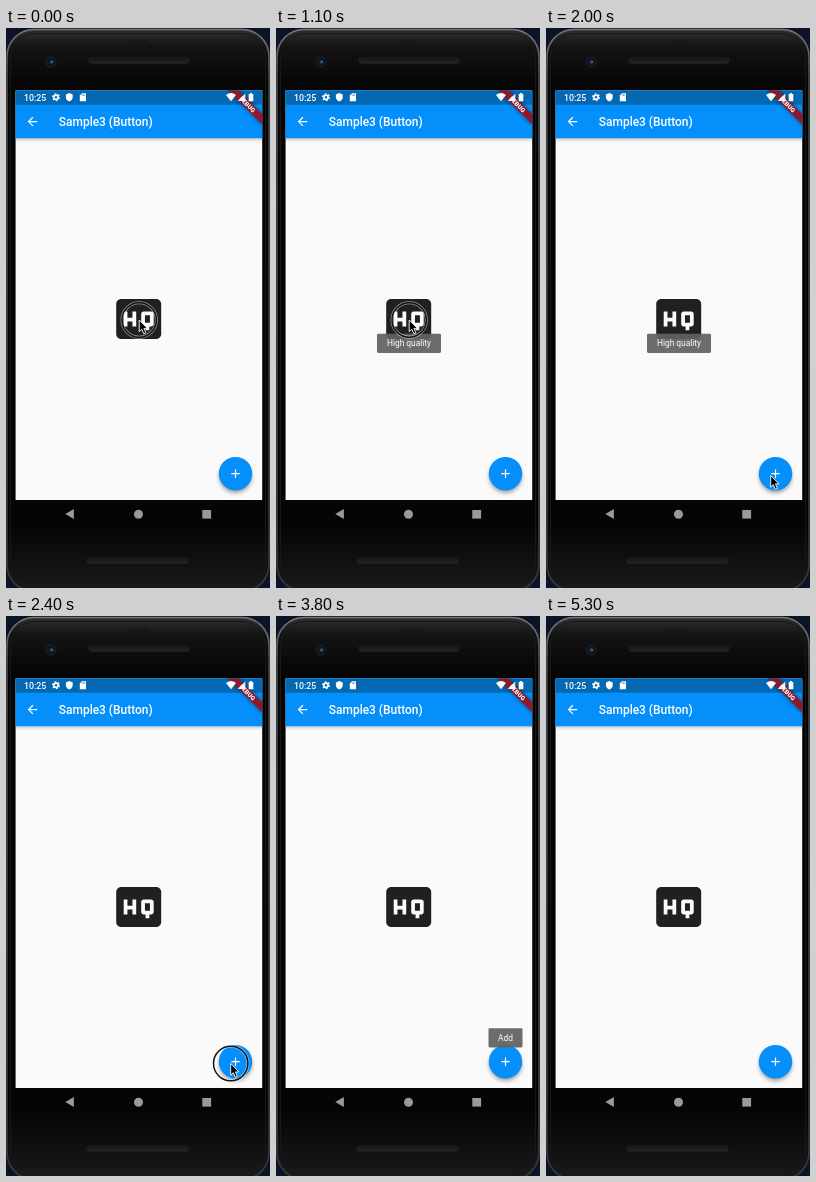
Recreate the animation shown at these times as an HTML page. Size 264 px wide and 560 px high, loop 5.4 s.

```html
<!DOCTYPE html>
<html lang="en">
<head>
<meta charset="utf-8">
<title>Button tooltips</title>
<style>
  html, body { margin: 0; width: 100%; height: 100%; overflow: hidden; background: #0b1426; }
  svg { display: block; font-family: Roboto, sans-serif; }
  .tip rect { fill: #616161; fill-opacity: .93; }
  .tip text { fill: #fff; font-size: 8.4px; text-anchor: middle; }
</style>
</head>
<body>
<svg width="264" height="560" viewBox="0 0 264 560">
  <defs>
    <clipPath id="screen"><rect x="9.6" y="62.4" width="246.6" height="409.6"/></clipPath>
    <filter id="soft" x="-50%" y="-50%" width="200%" height="200%"><feGaussianBlur stdDeviation="2.2"/></filter>
    <linearGradient id="slot" x2="0" y2="1">
      <stop stop-color="#141414"/><stop offset="1" stop-color="#262626"/>
    </linearGradient>
    <linearGradient id="edge" x2="0" y2="1">
      <stop stop-color="#777"/><stop offset=".08" stop-color="#484a4c"/><stop offset="1" stop-color="#38393b"/>
    </linearGradient>
    <linearGradient id="body" x2="0" y2="1">
      <stop stop-color="#303030"/><stop offset=".03" stop-color="#141414"/><stop offset=".1" stop-color="#050505"/>
      <stop offset=".88" stop-color="#050505"/><stop offset="1" stop-color="#1a1a1a"/>
    </linearGradient>
  </defs>

  <!-- phone body -->
  <rect x="0" y="154" width="2" height="38" fill="#222"/>
  <rect x="1" y="1.5" width="262" height="562" rx="27" fill="url(#body)" stroke="url(#edge)" stroke-width="1.6"/>
  <rect x="4.5" y="5.5" width="255" height="555" rx="24" fill="none" stroke="#181818"/>
  <g fill="url(#slot)" stroke="#222" stroke-width=".6">
    <rect x="82.5" y="29.5" width="101" height="6" rx="3"/>
    <rect x="80.5" y="530" width="102" height="5.5" rx="2.75"/>
  </g>
  <rect x="124" y="12" width="18" height="5" rx="1" fill="#15181c"/>
  <circle cx="45" cy="34" r="5" fill="#10141b" stroke="#20242a"/>
  <circle cx="45.3" cy="34" r="1.9" fill="#1c3860"/>
  <circle cx="46" cy="33.8" r=".9" fill="#4a80c0"/>

  <g clip-path="url(#screen)">
    <rect x="9" y="62" width="248" height="410" fill="#fafafa"/>
    <rect x="8" y="77" width="250" height="33.5" fill="#000" opacity=".38" filter="url(#soft)"/>
    <rect x="9" y="62" width="248" height="48.2" fill="#058ffb"/>
    <rect x="9" y="62" width="248" height="14.7" fill="#0468b3"/>

    <path transform="translate(19.3 86.4) scale(.598)" fill="#fff"
      d="M20 11H7.83l5.59-5.59L12 4l-8 8 8 8 1.41-1.41L7.83 13H20z"/>
    <text x="52.8" y="97.6" font-size="11.96" font-weight="500" fill="#fff">Sample3 (Button)</text>

    <!-- high quality icon -->
    <path transform="translate(102.7 261) scale(2.5)" fill="#202022"
      d="M19 4H5c-1.11 0-2 .9-2 2v12c0 1.1.89 2 2 2h14c1.1 0 2-.9 2-2V6c0-1.1-.9-2-2-2zm-8 11H9.5v-2h-2v2H6V9h1.5v2.5h2V9H11v6zm7-1c0 .55-.45 1-1 1h-.75v1.5h-1.5V15H14c-.55 0-1-.45-1-1v-4c0-.55.45-1 1-1h3c.55 0 1 .45 1 1v4zm-3.5-.5h2v-3h-2v3z"/>

    <!-- add button -->
    <circle cx="229.5" cy="448.6" r="16.2" opacity=".38" filter="url(#soft)"/>
    <circle cx="229.5" cy="445.7" r="16.75" fill="#058ffb"/>
    <path d="M225.3 445.7h8.4M229.5 441.5v8.4" stroke="#fff" stroke-width="1.2"/>

    <!-- debug ribbon -->
    <g transform="translate(256 62.5) rotate(45)">
      <rect x="-24" y="16.7" width="48" height="7.2" opacity=".5" filter="url(#soft)"/>
      <rect x="-24" y="16.7" width="48" height="7.2" fill="#8c1a2c"/>
      <text x="-.5" y="22.4" font-size="6.1" font-weight="900" fill="#fff" text-anchor="middle">DEBUG</text>
    </g>
  </g>

  <!-- status bar -->
  <g fill="#fff" transform="translate(0 -.3)">
    <text x="18" y="73" font-size="8.8" font-weight="500">10:25</text>
    <g fill="none" stroke="#fff">
      <circle cx="50" cy="69.5" r="2.1" stroke-width="1.7"/>
      <circle cx="50" cy="69.5" r="3.4" stroke-width="1.2" stroke-dasharray="1.78"/>
    </g>
    <path d="M63.3 65.3l3.4 1.4v2.5q0 3.2-3.4 4.6q-3.4-1.4-3.4-4.6v-2.5z"/>
    <path d="M76 65.5h4v8h-6.2v-5.8z"/>
    <path d="M76.2 66.7v1.5M77.5 66.7v1.5M78.8 66.7v1.5" stroke="#0468b3" stroke-width=".6"/>
    <path d="M220 67.4q5-4 10 0l-5 6.1z"/>
    <path d="M239.3 65.7v7.7h-7.6z" opacity=".9"/>
    <path d="M244 65.3h2v.9h1.3v7.3h-4.6v-7.3h1.3z"/>
  </g>

  <!-- navigation bar -->
  <g fill="#9a9a9a">
    <path d="M59.3 486l8.6-5v10z"/>
    <circle cx="132.5" cy="486.2" r="4.5"/>
    <rect x="196.3" y="482" width="8.8" height="8.6"/>
  </g>

  <g class="tip" id="qualityTip">
    <rect x="101" y="305.7" width="64" height="19.2" rx="1.3"/>
    <text x="133" y="318.2">High quality</text>
  </g>
  <g class="tip" id="addTip">
    <rect x="212.5" y="412.2" width="34" height="19.2" rx="1.3"/>
    <text x="229.5" y="424.8">Add</text>
  </g>

  <!-- pointer, with its press ring -->
  <g id="pointer">
    <g id="ring" fill="none">
      <circle r="17.2" stroke="#fff" stroke-width="3" opacity=".5"/>
      <circle r="17.2" stroke="#111" stroke-width="1.5"/>
    </g>
    <path d="M0 0v11.6l2.6-2.4 2 4.6 2.1-.9-2-4.5h3.6z" fill="#000" stroke="#fff" stroke-width=".9"/>
  </g>
</svg>
<script>
const LOOP = 5400, STEP = 100;
const ICON = [133.2, 292], ADD = [224.7, 447.5], AWAY = [280, 475];
const [qualityTip, addTip, pointer, ring] =
  ['qualityTip', 'addTip', 'pointer', 'ring'].map(id => document.getElementById(id));

const progress = (t, from, to) => Math.min(1, Math.max(0, (t - from) / (to - from)));
const ease = p => p * p * (3 - 2 * p);
const between = (t, from, to) => t >= from && t < to;
const fade = (t, show, hide) => progress(t, show, show + 150) - progress(t, hide, hide + 100);

function draw(t) {
  const toAdd = ease(progress(t, 1300, 1900));
  const leave = ease(progress(t, 3400, 3750));
  const [x, y] = ICON.map((v, i) => v + (ADD[i] - v) * toAdd + (AWAY[i] - ADD[i]) * leave);
  pointer.setAttribute('transform', `translate(${x} ${y})`);
  pointer.style.display = t < 3750 ? '' : 'none';
  ring.style.display = between(t, 0, 1250) || between(t, 2100, 3400) ? '' : 'none';
  qualityTip.style.opacity = fade(t, 550, 2100);
  addTip.style.opacity = fade(t, 2600, 4900);
}

function tick() {
  draw(Math.floor(performance.now() % LOOP / STEP) * STEP);
  requestAnimationFrame(tick);
}
tick();
</script>
</body>
</html>
```
